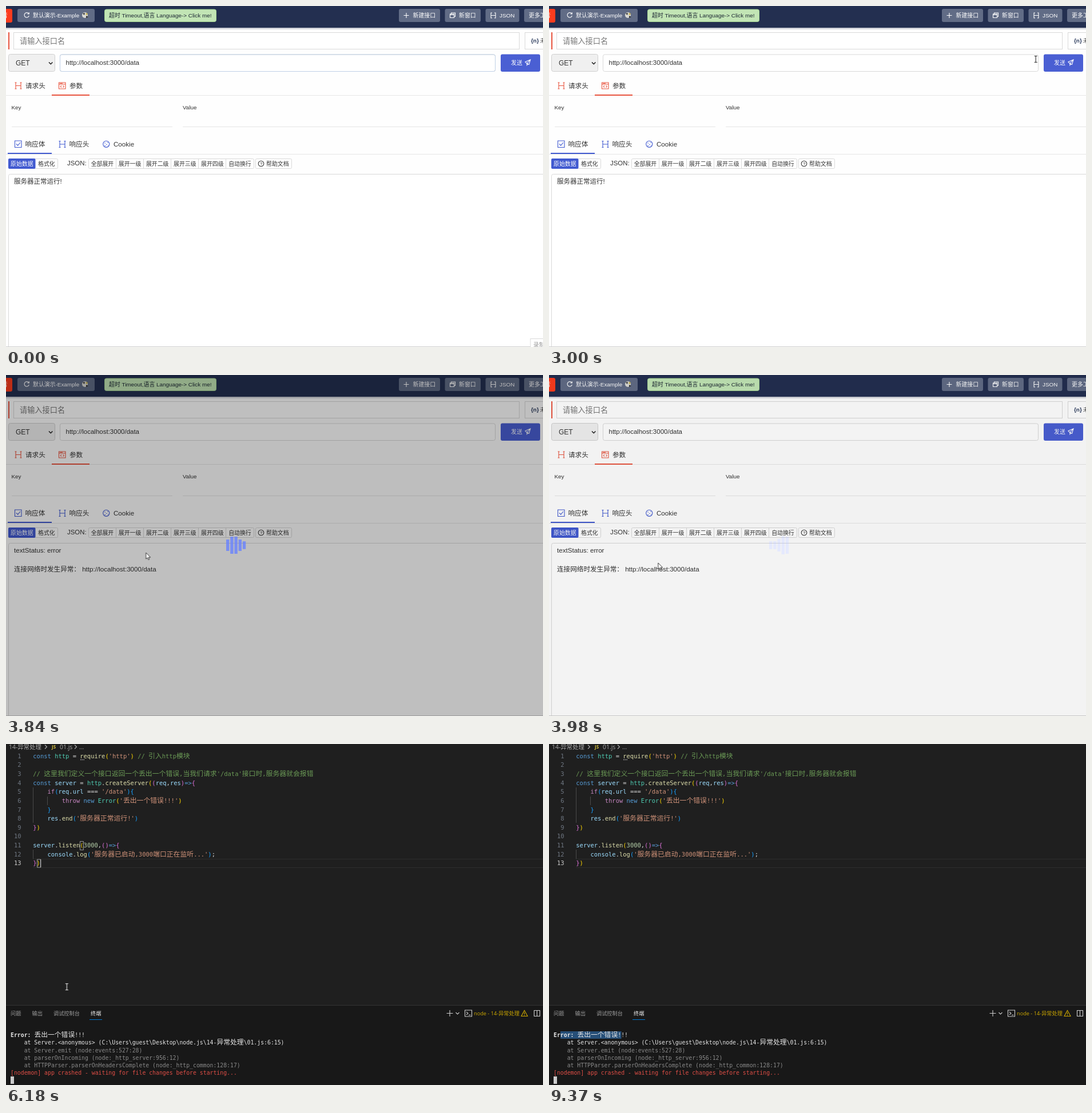
Write an HTML page that moves like this. It is 939 px wide and 597 px high and loops after 9700 ms.

```html
<!DOCTYPE html>
<html lang="zh">
<head>
<meta charset="utf-8">
<title>接口调试</title>
<style>
html,body{margin:0;width:100%;height:100%;overflow:hidden;background:#fff}
svg{display:block;width:100%;height:100%}
text{font-family:"Liberation Sans","Noto Sans CJK SC","Noto Sans CJK JP",sans-serif;white-space:pre}
#page text{font-weight:300}
#page .b{font-weight:bold}
.s{font-size:9.9px}
.m{font-size:11.6px}
.u{font-size:11.5px}
.w{fill:#fff}
.d{fill:#333}
.box{fill:#fff;stroke:#d9d9d9}
.btn{fill:#616c86}
.ln{stroke:#e6e6e6}
.ic{fill:none;stroke-width:1.1}
.red{stroke:#e8543f}
.blue{stroke:#4059d0}
.ed text{font-family:"Open Sans","Noto Sans CJK SC","Noto Sans CJK JP",sans-serif}
.ed .mono{font-family:"DejaVu Sans Mono","Noto Sans CJK SC","Noto Sans CJK JP",monospace;fill:#d4d4d4}
.mono .cjk{font-family:"Noto Sans CJK SC","Noto Sans CJK JP",sans-serif;font-weight:300}
.code{font-size:10.48px}.code .cjk{font-size:11.85px}
.term{font-size:9.82px}.term .cjk{font-size:11.82px}
.k{fill:#569cd6}.t{fill:#4ec9b0}.f{fill:#dcdcaa}.q{fill:#ce9178}.c{fill:#6a9955}.v{fill:#9cdcfe}
.p{fill:#c586c0}.n{fill:#b5cea8}.g1{fill:#ffd700}.g2{fill:#da70d6}.g3{fill:#179fff}
.hi{fill:#e5e5e5}.bold{fill:#e5e5e5;font-weight:bold}.lo{fill:#8a8a8a}.er{fill:#e04e46}
.sw text{font-family:"Open Sans","Noto Sans CJK SC","Noto Sans CJK JP",sans-serif;font-size:10.3px;fill:#fff}
.sw .cap{font-size:8.9px;fill:#b2b2b2}

/* one 9.7 s timeline; 1% = 97 ms */
.hold{animation:9.7s step-end infinite}
.ease{animation:9.7s linear infinite}
#rec{animation-name:rec}
#focus{animation-name:rec}
#old{animation-name:old}
#new{animation-name:new}
#hover{animation-name:hover}
#load{animation-name:load}
#alt{animation-name:alt}
#sel2{animation-name:sel2}
#sel3{animation-name:sel3}
#editor{animation-name:editor}
#match{animation-name:match}
#caret{animation-name:caret}
#mark{animation-name:mark}
#mouse{animation-name:mouse}
#arrow{animation-name:arrow}
#beam{animation-name:beam}
#hand{animation-name:hand}
#press{animation-name:press}
@keyframes rec{0%{opacity:1}.72%,100%{opacity:0}}
@keyframes old{0%{opacity:1}39.1%,100%{opacity:0}}
@keyframes new{0%{opacity:0}39.1%,100%{opacity:1}}
@keyframes hover{0%{opacity:0}32%{opacity:1}35.6%,100%{opacity:0}}
@keyframes load{0%,34.7%{opacity:0}38.4%,39.3%{opacity:1}39.59%{opacity:.85}41.03%{opacity:.17}41.6%,100%{opacity:0}}
@keyframes alt{0%{opacity:0}54.02%{opacity:.6}54.85%{opacity:1}61.1%,100%{opacity:0}}
@keyframes sel2{0%{opacity:1}57.5%,100%{opacity:0}}
@keyframes sel3{0%{opacity:0}57.5%,100%{opacity:1}}
@keyframes editor{0%{opacity:0}61.1%,100%{opacity:1}}
@keyframes match{0%{opacity:1}79.3%,100%{opacity:0}}
@keyframes caret{0%{opacity:1}66.5%{opacity:0}71.6%{opacity:1}76.8%,100%{opacity:0}}
@keyframes mark{
  0%,77.8%{width:0;animation-timing-function:step-end}
  78%{width:5.9px;animation-timing-function:step-end}
  78.8%{width:5.9px;animation-timing-function:steps(17)}
  87.63%,100%{width:106.5px}}
@keyframes mouse{
  0%,.72%{transform:translate(935px,597px)}
  5.15%{transform:translate(560px,330px)}
  10.1%{transform:translate(98px,122px)}
  12.89%{transform:translate(290px,128px)}
  15.46%{transform:translate(296px,74px)}
  17.53%{transform:translate(110px,74px)}
  18.56%{transform:translate(24px,92px)}
  20.2%{transform:translate(242px,91px)}
  21.65%,24.43%{transform:translate(143px,91px)}
  25.77%{transform:translate(28px,94px)}
  28.35%{transform:translate(420px,62px)}
  30.93%{transform:translate(851px,93px)}
  34.02%,34.9%{transform:translate(900px,98px)}
  39.59%{transform:translate(245px,311px)}
  41.03%{transform:translate(191px,329px)}
  44.74%{transform:translate(110px,296px)}
  47.42%{transform:translate(34px,330px)}
  49.48%{transform:translate(142px,352px)}
  51.96%,61.1%{transform:translate(125px,338px)}
  67.42%{transform:translate(80px,548px)}
  72.16%{transform:translate(24px,545px)}
  75.26%,77.6%{transform:translate(21px,511px)}
  78.66%{transform:translate(45px,512px)}
  87.63%{transform:translate(127px,512px)}
  88.66%{transform:translate(116px,541px)}
  92%{transform:translate(430px,572px)}
  96.2%,100%{transform:translate(915px,606px)}}
@keyframes arrow{0%{opacity:0}.72%{opacity:1}12.9%{opacity:0}25%{opacity:1}26.4%{opacity:0}35.6%{opacity:1}61.1%,100%{opacity:0}}
@keyframes beam{0%{opacity:0}12.9%{opacity:1}25%{opacity:0}26.4%{opacity:1}31.9%{opacity:0}61.1%{opacity:1;stroke:#eee}96.2%,100%{opacity:0;stroke:#eee}}
@keyframes hand{0%{opacity:0}31.9%{opacity:1}35.6%,100%{opacity:0}}
@keyframes press{0%{opacity:0}34.3%{opacity:1}35.6%{opacity:0}77.3%{opacity:1}88%,100%{opacity:0}}
#bars rect{fill:#6179f0;transform-box:fill-box;transform-origin:center;animation:wave .97s ease-in-out infinite}
@keyframes wave{0%,40%,100%{transform:scaleY(.42)}20%{transform:scaleY(1)}}
</style>
</head>
<body>
<svg viewBox="0 0 939 597">
<defs>
  <linearGradient id="fade" x2="0" y2="1"><stop offset="0" stop-color="#fff"/><stop offset=".25" stop-color="#f4f4f4"/><stop offset="1" stop-color="#8f8f8f"/></linearGradient>
  <linearGradient id="shade" x2="0" y2="1"><stop offset="0" stop-color="#b9bcc6"/><stop offset="1" stop-color="#fff"/></linearGradient>
  <path id="h" d="M1.5 .5V11.5M10.5 .5V11.5M0 .5H3M9 .5H12M0 11.5H3M9 11.5H12M1.5 6H10.5"/>
</defs>

<g id="page">
  <rect width="939" height="597" fill="#fefefe"/>
  <rect y="38" width="939" height="4" fill="url(#shade)"/>
  <rect width="939" height="38" fill="#232f50"/>
  <rect x="-8" y="5" width="19" height="24" rx="3" fill="#fb3c1e"/>
  <text class="s w" x="-7" y="20">者</text>
  <g class="btn">
    <rect x="20" y="5" width="135" height="23" rx="3"/><rect x="687" y="5" width="72" height="23" rx="3"/>
    <rect x="767.5" y="5" width="62.5" height="23" rx="3"/><rect x="838.5" y="5" width="59" height="23" rx="3"/>
    <rect x="906" y="5" width="60" height="23" rx="3"/>
  </g>
  <g class="ic" stroke="#fff">
    <path d="M39.6 13.2A4.2 4.2 0 1 0 40.3 17M40.3 11.3V14H37.4"/>
    <path d="M695.5 16.5H704.5M700 12V21"/>
    <path d="M776.5 14H783.5V20.5H776.5ZM778.5 14V12H785.5V18.5H783.5M776.5 15.2H783.5"/>
    <path d="M850 12H848V21H850M854 12H856V21H854M848 16.5H856"/>
  </g>
  <text class="s w" x="47" y="20">默认演示-Example</text>
  <circle cx="138" cy="16" r="5" fill="#d9d9d4"/><path d="M134 13L138 12 137 16ZM140 17L144 19 140 21Z" fill="#333"/><circle cx="141" cy="14" r="1.7" fill="#c9b552"/>
  <rect x="172.5" y="6" width="195" height="21.5" rx="3" fill="#c2e5b5" stroke="#a5d394"/>
  <text class="s" x="180" y="20.3" fill="#1c2733">超时 Timeout,语言 Language-&gt; Click me!</text>
  <text class="s w" x="711.5" y="20">新建接口</text><text class="s w" x="792" y="20">新窗口</text>
  <text class="s w" x="863" y="20">JSON</text><text class="s w" x="914" y="20">更多工具</text>

  <rect x="4" y="46" width="2" height="30" fill="#e8543f"/>
  <rect class="box" x="13.5" y="46.5" width="884" height="29"/>
  <text x="24" y="65.5" font-size="13.2" fill="#777">请输入接口名</text>
  <rect class="box" x="907.5" y="46.5" width="60" height="29"/>
  <text class="b" x="918" y="63.5" font-size="9.9" fill="#2a3a5c">{n}</text><text x="934" y="63.5" font-size="9.5" fill="#444">未</text>
  <rect x="4.5" y="84.5" width="81" height="30" rx="3" fill="#f0f0f0" stroke="#cfcfcf"/>
  <text class="d" x="17" y="103.6" font-size="12">GET</text>
  <path class="ic" d="M75 98.5L78.2 101.7 81.4 98.5" stroke="#222" style="stroke-width:1.6"/>
  <rect class="box" x="94.5" y="85" width="761" height="29.5" rx="3"/>
  <rect id="focus" class="hold" x="94.5" y="85" width="761" height="29.5" rx="3" fill="none" stroke="#bfd0e6"/>
  <text class="u d" x="104.5" y="103">http://localhost:3000/data</text>
  <rect x="865" y="84.5" width="69" height="30.5" rx="3" fill="#4a5fd3"/>
  <rect id="hover" class="hold" x="865" y="84.5" width="69" height="30.5" rx="3" fill="#4054be"/>
  <text class="s w" x="883" y="102.5">发送</text>
  <path class="ic" d="M907.5 98L917 94 914.5 102.5 911 100.5 917 94M907.5 98L911 100.5V103.5L912.5 101.5" stroke="#fff"/>

  <g class="ic red">
    <use href="#h" x="15.5" y="133.5"/>
    <path d="M92.5 134H104V145H92.5ZM92.5 137H104M94 135.5H99M97 139L95.3 141 97 143M99.5 139L101.2 141 99.5 143"/>
  </g>
  <text class="m d" x="34" y="143.7">请求头</text><text class="m d" x="111" y="143.7">参数</text>
  <path class="ln" d="M0 156.5H939"/><rect x="80" y="155" width="66" height="2" fill="#e8543f"/>
  <text class="s d" x="9.5" y="180.6">Key</text><text class="s d" x="309" y="180.6">Value</text>
  <path class="ln" d="M10 211.5H291M309 211.5H939"/>
  <g class="ic blue">
    <path d="M15.5 236H27V247.5H15.5ZM18 241.5L20.7 244.2 25 239"/>
    <use href="#h" x="92.5" y="236"/>
    <circle cx="175.3" cy="241.8" r="5.6"/>
    <path d="M172.5 240H174M177 239H178.5M175 242.5H176.5M172.5 244.5H174M178 244H179"/>
  </g>
  <text class="m d" x="33.5" y="246">响应体</text><text class="m d" x="110.5" y="246">响应头</text><text class="m d" x="188" y="245.5">Cookie</text>
  <path class="ln" d="M0 259.5H939"/><rect x="3" y="257" width="77" height="2" fill="#4059d0"/>
  <rect x="4.5" y="267.5" width="86" height="17" rx="2" class="box"/>
  <rect x="4" y="267" width="47.5" height="18" rx="2" fill="#4059d0"/>
  <text class="s w" x="8" y="279.7">原始数据</text><text class="s d" x="56" y="279.7">格式化</text>
  <text class="d" x="107" y="278.5" font-size="11.4">JSON:</text>
  <rect class="box" x="144.5" y="267.5" width="289" height="17" rx="2"/>
  <path d="M192.5 268V284M240.5 268V284M288.5 268V284M336.5 268V284M384.5 268V284" stroke="#d9d9d9"/>
  <g id="tools" class="s d"></g>
  <rect class="box" x="436.5" y="267.5" width="63" height="17" rx="2"/>
  <circle class="ic" cx="446" cy="276" r="4.8" stroke="#333"/><text class="d" x="444" y="279" font-size="8">?</text>
  <text class="s d" x="455" y="279.7">帮助文档</text>
  <rect class="box" x="4.5" y="294.5" width="960" height="330" rx="3"/>
  <path d="M0 596.5H939" stroke="#cfcfcf"/>
  <text id="old" class="hold u d" x="14" y="311">服务器正常运行!</text>
  <g id="new" class="hold m d"><text x="14" y="311">textStatus: error</text><text x="14" y="343.5">连接网络时发生异常： http://localhost:3000/data</text></g>
  <g id="rec" class="hold"><rect class="box" x="917" y="582.5" width="40" height="30"/><text x="922" y="596.5" font-size="10" fill="#999">录制</text></g>
</g>

<g id="load" class="ease">
  <rect width="939" height="597" opacity=".3"/>
  <g id="bars"></g>
</g>

<g id="alt" class="hold sw">
  <rect y="196" width="928" height="161" fill="#202020" fill-opacity=".88"/>
  <g id="thumbs"></g>
  <rect id="sel2" class="hold" x="74" y="216" width="142" height="123" fill="none" stroke="#fff" stroke-width="2"/>
  <rect id="sel3" class="hold" x="218.5" y="216" width="179" height="123" fill="none" stroke="#fff" stroke-width="2"/>
  <text x="0" y="234">p接口调...</text>
  <text x="101" y="234">PanelLooper</text>
  <text x="246" y="234">01.js - node.js - Lumina E...</text>
  <text x="427" y="234">node学习...</text>
  <text x="541" y="234">叙言</text>
  <text x="651.5" y="234">PanelLooper - 编...</text>
  <text x="795" y="234">Harboured Tran...</text>
  <text class="cap" x="633" y="256">PanelLooper - 编辑器</text>
  <text class="cap" x="777" y="256">Harboured Transit Fetch ...</text>
</g>

<g id="editor" class="hold ed">
  <rect width="939" height="597" fill="#1f1f1f"/>
  <g fill="#a9a9a9" font-size="10.4">
    <text x="5" y="9">14-异常处理</text><text x="94" y="9">01.js</text><text x="128" y="9">...</text>
    <text x="80" y="8" font-size="8" font-weight="bold" fill="#d5c03e">JS</text>
  </g>
  <path class="ic" d="M68 1.5L71.5 5 68 8.5M120 1.5L123.5 5 120 8.5" stroke="#a9a9a9"/>
  <path d="M47.5 76V138M72.5 92V107M47.5 185V201" stroke="#4a4a4a"/>
  <path d="M47 201.5H939M47 216.5H939" stroke="#2d2d2d"/>
  <path d="M130 27.5H137" stroke="#aaa" stroke-width="1.5" stroke-dasharray="1.5 1.2"/>
  <g id="code" class="code"></g>
  <path id="match" class="hold" d="M129.5 170.5H135.5V185.5H129.5ZM54.5 202H60.5V216H54.5Z" fill="none" stroke="#999"/>
  <rect id="caret" class="hold" x="60" y="202" width="1.2" height="14" fill="#ccc"/>
  <rect y="457" width="939" height="140" fill="#181818"/>
  <path d="M0 457.5H939" stroke="#333"/>
  <g font-size="9.2" fill="#9d9d9d">
    <text x="8" y="475">问题</text><text x="45.5" y="475">输出</text><text x="83" y="475">调试控制台</text>
    <text x="148" y="475" fill="#eee">终端</text><text x="818" y="475.3" fill="#cca700">node - 14-异常处理</text>
  </g>
  <path d="M146 482.5H168" stroke="#0078d4"/>
  <g class="ic" stroke="#ccc">
    <path d="M770.5 471.5H781.5M776 466V477M786.5 470L789.5 473 792.5 470M802.5 466H814.5V477H802.5ZM805 469L808 471.5 805 474M809 474.5H812.5M923.5 466.5H933.5V476.5H923.5ZM928.5 466.5V476.5"/>
    <path d="M906.5 466.5L912 476.5H901ZM906.5 470V473.3M906.5 474.3V475.4" stroke="#cca700"/>
  </g>
  <rect id="mark" class="ease" x="20" y="503" width="0" height="13" fill="#264f78"/>
  <g id="term" class="term"></g>
  <rect x="8" y="582" width="6" height="13" fill="#ccc"/>
</g>

<g id="mouse" class="ease">
  <circle id="press" class="hold" cx="-2" cy="-1" r="9.8" fill="#d6c200" fill-opacity=".8"/>
  <path id="arrow" class="hold" d="M0 0V11L2.5 8.7 4.2 12.4 5.9 11.7 4.3 8.1H7.8Z" fill="#fff" stroke="#222" stroke-width=".9"/>
  <path id="beam" class="hold" d="M-2.5 -5.5H2.5M0 -5.5V5.5M-2.5 5.5H2.5" fill="none" stroke="#222" stroke-width="1.1"/>
  <path id="hand" class="hold" d="M0 0Q1.5 -1 2 .5V5L7 6.2Q8.2 6.7 7.8 8.5L7 13H1L-2.8 8Q-2.5 6.3 -.4 7.6Z" fill="#fff" stroke="#222" stroke-width=".9"/>
</g>
</svg>
<script>
const $ = id => document.getElementById(id);
function add(parent, tag, attrs, text) {
  const el = document.createElementNS('http://www.w3.org/2000/svg', tag);
  for (const k in attrs) el.setAttribute(k, attrs[k]);
  if (text !== undefined) el.textContent = text;
  return parent.appendChild(el);
}
const rect = (p, x, y, width, height, fill, rx = 0) => add(p, 'rect', {x, y, width, height, fill, rx});

['全部展开', '展开一级', '展开二级', '展开三级', '展开四级', '自动换行']
  .forEach((s, i) => add($('tools'), 'text', {x: 148.7 + i * 48.1, y: 279.7}, s));

for (let i = 0; i < 5; i++)
  rect($('bars'), 385 + i * 7.2, 282, 5.4, 32, '').style.animationDelay = -347 + 75 * i + 'ms';

// "~class|text" starts a coloured run; wide characters get their own size
function mono(parent, x, y, src) {
  const line = add(parent, 'text', {class: 'mono', x, y});
  for (const run of src.split('~').filter(Boolean)) {
    const cut = run.indexOf('|');
    const span = add(line, 'tspan', {class: run.slice(0, cut)});
    for (const part of run.slice(cut + 1).match(/[\x00-\xff]+|[^\x00-\xff]+/g))
      add(span, 'tspan', part.charCodeAt(0) > 255 ? {class: 'cjk'} : {}, part);
  }
}

[
  "~k|const ~t|http~x| = ~f|require~g1|(~q|'http'~g1|)~c| // 引入http模块",
  "",
  "~c|// 这里我们定义一个接口返回一个丢出一个错误,当我们请求'/data'接口时,服务器就会报错",
  "~k|const ~v|server~x| = ~t|http~x|.~f|createServer~g1|(~g2|(~v|req~x|,~v|res~g2|)~k|=>~g2|{",
  "~p|    if~g3|(~v|req~x|.~v|url~x| === ~q|'/data'~g3|){",
  "~p|        throw ~k|new ~t|Error~g1|(~q|'丢出一个错误!!!'~g1|)",
  "~g3|    }",
  "~v|    res~x|.~f|end~g3|(~q|'服务器正常运行!'~g3|)",
  "~g2|}~g1|)",
  "",
  "~v|server~x|.~f|listen~g1|(~n|3000~x|,~g2|()~k|=>~g2|{",
  "~v|    console~x|.~f|log~g3|(~q|'服务器已启动,3000端口正在监听...'~g3|)~x|;",
  "~g2|}~g1|)"
].forEach((src, i) => {
  const y = 24.8 + i * 15.62;
  add($('code'), 'text', {class: 'mono', x: 26.5, y, 'text-anchor': 'end', style: `fill:${i == 12 ? '#ccc' : '#6e7681'}`}, i + 1);
  mono($('code'), 47.3, y, src);
});

[
  "~bold|Error:~hi| 丢出一个错误!!!",
  "~hi|    at Server.<anonymous> (C:\\Users\\guest\\Desktop\\node.js\\14-异常处理\\01.js:6:15)",
  "~lo|    at Server.emit (node:events:527:28)",
  "~lo|    at parserOnIncoming (node:_http_server:956:12)",
  "~lo|    at HTTPParser.parserOnHeadersComplete (node:_http_common:128:17)",
  "~er|[nodemon] app crashed - waiting for file changes before starting..."
].forEach((src, i) => mono($('term'), 8, 513.2 + i * 13.2, src));

// window switcher miniatures
const T = $('thumbs');
let seed = 7;
const rnd = () => (seed = seed * 16807 % 2147483647) / 2147483647;
function lines(x, y, n, step, min, max, colors) {
  for (let i = 0; i < n; i++)
    rect(T, x + (i % 3) * 2, y + i * step, min + rnd() * (max - min), 1.2, colors[i % colors.length]);
}
rect(T, 0, 243, 68, 91, '#fff');
rect(T, 0, 246, 68, 10, '#26375c');
rect(T, 0, 245, 60, 1.5, '#c9a23c');
for (let i = 0; i < 4; i++) rect(T, 21 + i * 11, 252, 9, 3, '#8d97ad');
rect(T, 45, 263, 9, 3, '#4a5fd3');
rect(T, 55, 263, 10, 3, '#e8543f');

rect(T, 79, 223, 18, 13, '#e6e6e6');
rect(T, 78, 243, 133, 91, '#fff');
rect(T, 79, 247, 132, 83, '#3b3b3b');
for (let i = 0; i < 5; i++) rect(T, 166 + i * 9, 331, 3, 2, i % 2 ? '#d55' : '#777');

rect(T, 223, 221, 18, 18, '#2489ca');
rect(T, 222, 243, 171, 93, '#1e1e1e');
rect(T, 222, 243, 171, 3, '#333');
lines(231, 249, 15, 5, 8, 15, ['#777', '#b5a642', '#567']);
lines(258, 249, 13, 3.2, 18, 66, ['#569cd6', '#6a9955', '#9a8a70']);
rect(T, 253, 312, 140, .7, '#444');
lines(256, 316, 6, 2.8, 20, 62, ['#888', '#777', '#a44']);
rect(T, 222, 333, 11, 3, '#2489ca');

rect(T, 405, 221, 17, 17, '#f5f5f5', 3);
rect(T, 404, 243, 103, 91, '#fff');
rect(T, 408, 249, 92, 38, '#f6f6f6');
lines(411, 251, 11, 3.2, 20, 72, ['#999', '#88a', '#b99']);
rect(T, 408, 292, 15, 2, '#222');
rect(T, 411, 298, 84, 1.5, '#555');
rect(T, 411, 308, 84, 1.5, '#555');
rect(T, 408, 316, 5, 1, '#888');

add(T, 'circle', {cx: 528, cy: 230, r: 9, fill: '#43b77c'});
rect(T, 519, 243, 99, 91, '#f7f7f7');
rect(T, 519, 243, 6, 91, '#2e2e2e');
rect(T, 525, 243, 37, 91, '#e3e3e3');
for (let i = 0; i < 9; i++) {
  const y = 253 + i * 9.2;
  if (i == 8) rect(T, 525, y - 1, 37, 8, '#bcbcbc');
  rect(T, 527, y, 6, 6, ['#554a45', '#b5806c', '#3f79c4', '#3a9a68'][i % 4]);
  rect(T, 535, y + 1, 18, 1.2, '#777');
  rect(T, 535, y + 4, 13, 1, '#aaa');
}
[[252, 5], [262, 15], [284, 10], [297, 15]].forEach(([y, h]) => {
  rect(T, 583, y, 24, h, '#24272b');
  rect(T, 586, y + h / 2, 15, 1.5, '#a05a50');
  rect(T, 609, y, 5, 5, '#444');
});
rect(T, 562, 314, 56, .6, '#ddd');
rect(T, 600, 328, 12, 4, '#e0e0e0');

rect(T, 629, 223, 18, 13, '#d6d6d6');
rect(T, 629, 243.5, 132, 90, 'url(#fade)');
rect(T, 682, 288, 26, 18, '#777');
add(T, 'circle', {cx: 782, cy: 229, r: 9, fill: '#3f8f4a'});
rect(T, 773, 243.5, 132, 90, 'url(#fade)');
add(T, 'circle', {cx: 838, cy: 298, r: 10.5, fill: '#3f8f4a'});
</script>
</body>
</html>
```
